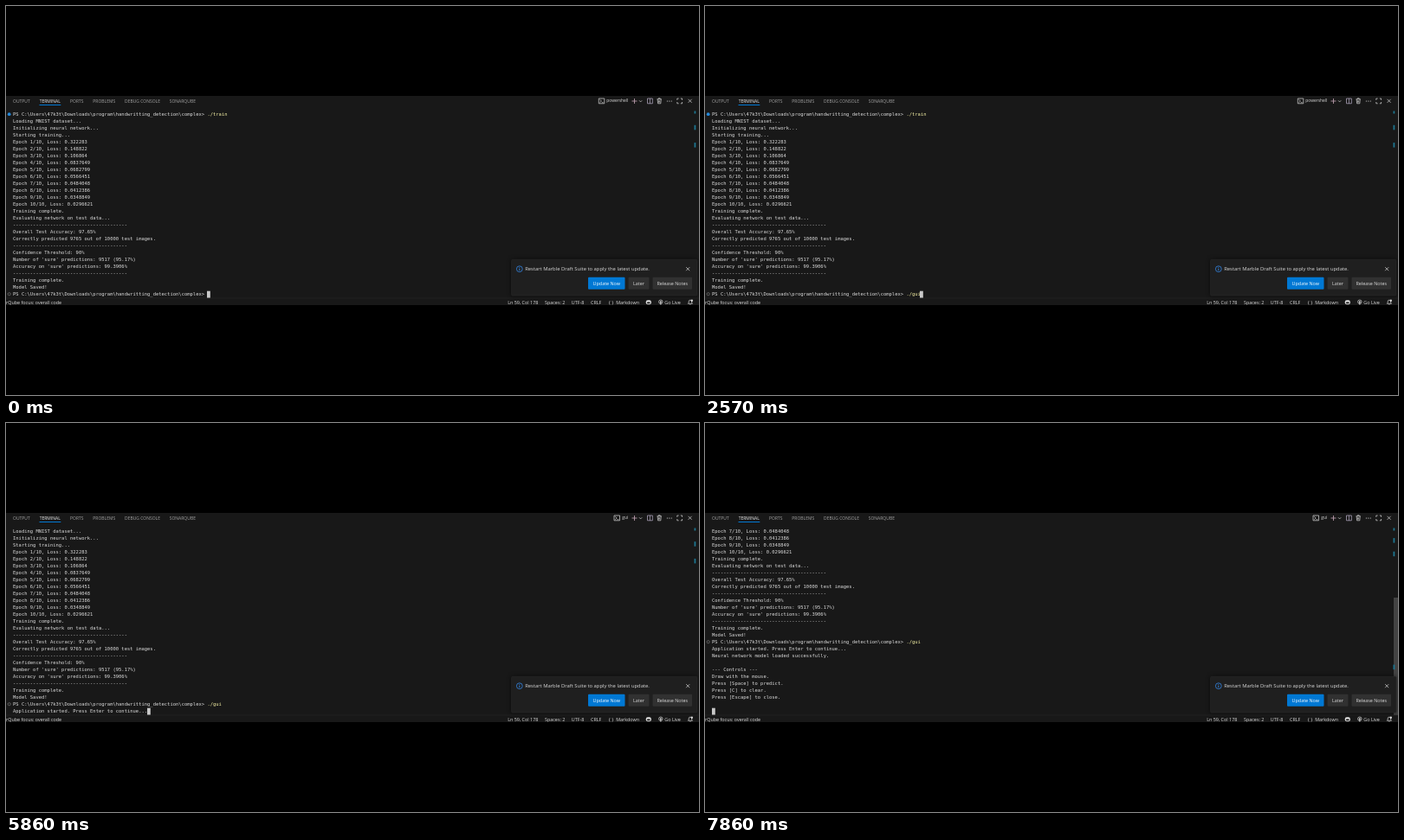
Recreate the animation shown at these times as an HTML page with a canvas. Size 800 by 450 pixels, loop 8 s.

```html
<!DOCTYPE html>
<html lang="en">
<head>
<meta charset="utf-8">
<title>Terminal session</title>
<style>
html, body { margin: 0; width: 100%; height: 100%; overflow: hidden; background: #000; }
canvas { display: block; }
</style>
</head>
<body>
<canvas id="stage" width="800" height="450"></canvas>
<script>
const ctx = document.getElementById('stage').getContext('2d');
const LOOP = 8000, ROWS = 27, ROW_H = 8, CHAR_W = 3.3, LEFT = 8, TOP = 125.2;
const MONO = '"DejaVu Sans Mono", monospace', MONO_SIZE = 5.48;
const SANS = '"Open Sans", "Noto Sans", sans-serif';
const FG = '#dcdcdc', YELLOW = '#f5f1a5', BLUE = '#0078d4';

const PROMPT = 'PS C:\\Users\\47k3t\\Downloads\\program\\handwritting_detection\\complex> ';
const RULE = '-'.repeat(40);
const LOSSES = ['0.322283', '0.148822', '0.106864', '0.0837649', '0.0682799',
  '0.0566451', '0.0484048', '0.0412386', '0.0348849', '0.0296621'];
const TRAINING = [
  PROMPT + './train',
  'Loading MNIST dataset...',
  'Initializing neural network...',
  'Starting training...',
  ...LOSSES.map((loss, i) => `Epoch ${i + 1}/10, Loss: ${loss}`),
  'Training complete.',
  'Evaluating network on test data...',
  RULE,
  'Overall Test Accuracy: 97.65%',
  'Correctly predicted 9765 out of 10000 test images.',
  RULE,
  'Confidence Threshold: 90%',
  "Number of 'sure' predictions: 9517 (95.17%)",
  "Accuracy on 'sure' predictions: 99.3906%",
  RULE,
  'Training complete.',
  'Model Saved!'
];
const CONTROLS = ['', '--- Controls ---', 'Draw with the mouse.', 'Press [Space] to predict.',
  'Press [C] to clear.', 'Press [Escape] to close.', ''];

const KEY_TIMES = [1570, 1860, 2140, 2290, 2430];
const ENTER = 3000, STARTED = 3430, RENAMED = 3570, CONFIRMED = 6860, LOADED = 7000, HELP = 7570;
const SCROLL_TIMES = [ENTER, CONFIRMED, LOADED, HELP];

// Glyphs are laid out large and scaled down so that advances stay fractional.
function text(str, x, y, size, color = FG, family = SANS, align = 'left') {
  ctx.save();
  ctx.translate(x, y + size * 0.36);
  ctx.scale(0.1, 0.1);
  ctx.font = `${size * 10}px ${family}`;
  ctx.textAlign = align;
  ctx.fillStyle = color;
  ctx.fillText(str, 0, 0);
  ctx.restore();
}

function rect(x, y, w, h, color, radius = 0) {
  ctx.fillStyle = color;
  ctx.beginPath();
  ctx.roundRect(x, y, w, h, radius);
  ctx.fill();
}

function stroke(path, color = FG, width = 0.7) {
  ctx.strokeStyle = color;
  ctx.lineWidth = width;
  ctx.stroke(new Path2D(path));
}

function dot(x, y, r, color, filled) {
  ctx.beginPath();
  ctx.arc(x, y, r, 0, Math.PI * 2);
  ctx.fillStyle = ctx.strokeStyle = color;
  ctx.lineWidth = 0.7;
  filled ? ctx.fill() : ctx.stroke();
}

const cross = (x, y) => stroke(`M${x - 2} ${y - 2}l4 4m0-4l-4 4`);

function terminalLines(t) {
  const typed = './gui'.slice(0, KEY_TIMES.filter(k => t >= k).length);
  const lines = [...TRAINING, PROMPT + typed];
  if (t >= ENTER) lines.push(t >= STARTED ? 'Application started. Press Enter to continue...' : '');
  if (t >= CONFIRMED) lines.push(t >= LOADED ? 'Neural network model loaded successfully.' : '');
  if (t >= HELP) lines.push(...CONTROLS);
  if (t >= LOADED) lines.push('');
  return lines;
}

function drawTerminal(t) {
  const lines = terminalLines(t);
  const scroll = lines.length - ROWS;
  lines.slice(scroll).forEach((line, row) => {
    const y = TOP + row * ROW_H;
    if (!line.startsWith(PROMPT)) return text(line, LEFT, y, MONO_SIZE, FG, MONO);
    text(PROMPT, LEFT, y, MONO_SIZE, FG, MONO);
    text(line.slice(PROMPT.length), LEFT + PROMPT.length * CHAR_W, y, MONO_SIZE, YELLOW, MONO);
    const finished = line.endsWith('train');
    dot(3.7, y, finished ? 1.9 : 1.6, finished ? '#2489db' : '#777', finished);
  });
  const column = lines[lines.length - 1].length;
  rect(Math.floor(LEFT + column * CHAR_W), 329.7, 3.8, 8, '#c8c8c8');
  drawScrollbar(scroll, t);
}

// The slider appears on scrolling, then lingers and fades out.
function sliderOpacity(t) {
  const lastScroll = Math.max(...SCROLL_TIMES.filter(time => time <= t));
  return Math.max(0, Math.min(1, 1 - (t - lastScroll - 500) / 800));
}

function drawScrollbar(scroll, t) {
  const above = 6.3 + scroll, total = above + ROWS;
  const yOf = line => 120 + line / total * 218;
  ctx.globalAlpha = sliderOpacity(t);
  rect(795, yOf(above), 5, 338 - yOf(above), '#434343');
  ctx.globalAlpha = 1;
  rect(794.5, 121.5, 1.8, 3, '#1d7590');
  for (const line of [3.1, 6.2, 32.2]) rect(794.5, yOf(line) - 2.5, 1.8, 5.5, '#1d7590');
}

function drawHeader(t) {
  const tabs = [['OUTPUT', 8], ['TERMINAL', 38.7], ['PORTS', 74], ['PROBLEMS', 100.3],
    ['DEBUG CONSOLE', 137], ['SONARQUBE', 188.7]];
  for (const [name, x] of tabs) text(name, x, 110.2, 5, name === 'TERMINAL' ? '#f0f0f0' : '#a4a4a4');
  rect(38.5, 114, 24.8, 1, BLUE);

  const renamed = t >= RENAMED, x = renamed ? 702 : 684.3;
  text(renamed ? 'gui' : 'powershell', 718.3, 109.7, 4.9, FG, SANS, 'right');
  stroke(`M${x} 107h6.5v5.8h-6.5zm1.3 1.3l1.8 1.7-1.8 1.7m2.4 0h1.5`);
  stroke('M725.5 107v6m-3-3h6', '#c9a9ba', 0.8);
  stroke('M731 109.3l1.6 1.6 1.6-1.6');
  stroke('M740.5 107h5.8v5.8h-5.8zm2.9 0v5.8', '#bdb3cd');
  stroke('M751.5 107.8h5.4m-3.7 0v-1h2v1m-3 .2l.4 4.8h3.2l.4-4.8m-2.8 1.3v2.3m1.2-2.3v2.3');
  for (const cx of [763.4, 765.8, 768.2]) dot(cx, 110, 0.6, FG, true);
  stroke('M774.8 108.8v-1.8h1.8m2.2 0h1.8v1.8m0 2.2v1.8h-1.8m-2.2 0h-1.8v-1.8');
  cross(789.6, 109.8);
}

function drawStatusBar() {
  rect(0, 338, 800, 8, '#181818');
  rect(0, 337.8, 800, 0.5, '#2b2b2b');
  const items = [['rQube focus: overall code', 0], ['Ln 59, Col 178', 579.2], ['Spaces: 2', 622],
    ['UTF-8', 652.8], ['CRLF', 675], ['{ }', 695.8], ['Markdown', 704.2], ['Go Live', 760.3]];
  for (const [label, x] of items) text(label, x, 343, 5.4);
  rect(738.8, 340.3, 6, 5, FG, 2);
  rect(740, 342.5, 3.6, 1.7, '#181818', 0.6);
  dot(755.8, 342.2, 2.2, FG, false);
  dot(755.8, 342.2, 0.9, FG, true);
  stroke('M755.8 342.5v3', FG, 1);
  stroke('M787.4 344.3h5l-.8-1.2v-1.2a1.7 1.7 0 0 0-3.4 0v1.2zm2 1h1');
  dot(791.8, 340.7, 1.2, FG, true);
}

function drawNotification() {
  ctx.save();
  ctx.shadowColor = '#000a';
  ctx.shadowBlur = 5;
  rect(583.5, 293.2, 214.5, 41.8, '#1f1f1f', 1.5);
  ctx.restore();
  ctx.strokeStyle = '#2d2d2d';
  ctx.lineWidth = 0.5;
  ctx.stroke();
  dot(592.8, 304.2, 3.4, '#3794ff', false);
  stroke('M592.8 303.6v2.5m0-4.2v.8', '#3794ff', 0.8);
  text('Restart Marble Draft Suite to apply the latest update.', 599.2, 304.2, 5.85);
  cross(787.2, 304.2);
  const buttons = [['Update Now', 672, 42.5, BLUE, '#fff'], ['Later', 718.5, 24, '#313131', FG],
    ['Release Notes', 746.5, 45.5, '#313131', FG]];
  for (const [label, x, w, fill, color] of buttons) {
    rect(x, 313.8, w, 14, fill, 1);
    text(label, x + w / 2, 320.9, 5.4, color, SANS, 'center');
  }
}

function draw(t) {
  rect(0, 0, 800, 450, '#000');
  rect(0, 104, 800, 242, '#181818');
  drawHeader(t);
  drawTerminal(t);
  drawStatusBar();
  drawNotification();
}

const start = performance.now();
function tick() {
  draw((performance.now() - start) % LOOP);
  requestAnimationFrame(tick);
}
tick();
</script>
</body>
</html>
```
